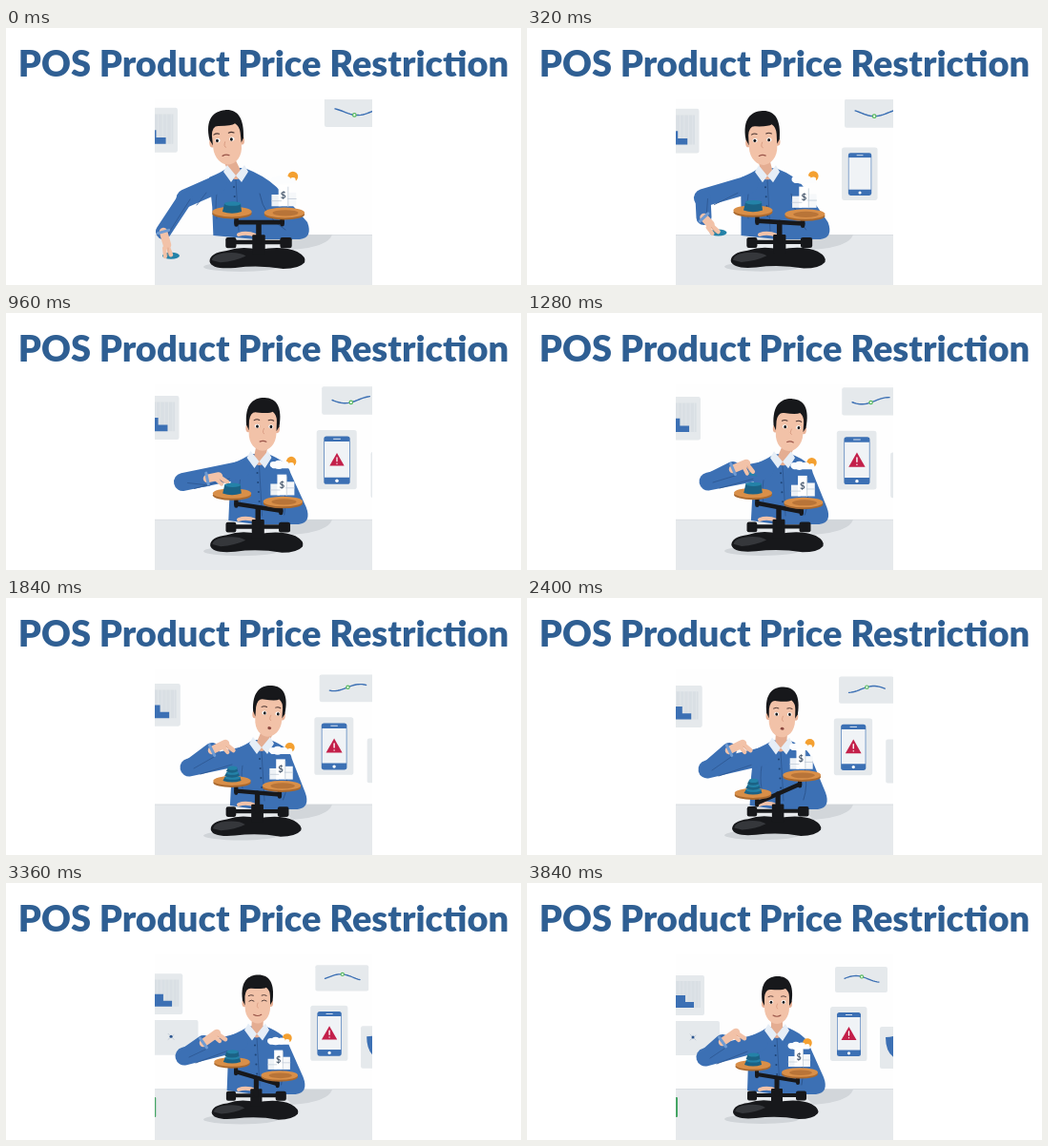
These frames come from a looping animation (540 by 270 pixels, 3.92 s). An HTML page with a canvas:

```html
<!DOCTYPE html>
<html lang="en">
<head>
<meta charset="utf-8">
<title>POS Product Price Restriction</title>
<style>
html, body { margin: 0; width: 100%; height: 100%; overflow: hidden; background: #fff; }
canvas, svg { position: absolute; left: 0; top: 0; width: 540px; height: 270px; }
text { font: 900 38px Lato, sans-serif; fill: #2f5f93; text-anchor: middle; }
</style>
</head>
<body>
<canvas id="scene" width="540" height="270"></canvas>
<svg viewBox="0 0 540 270"><text x="270" y="51">POS Product Price Restriction</text></svg>
<script>
const LOOP = 3920, STEP = 80;
const c = document.getElementById('scene').getContext('2d');
const BLUE = '#3c70b4', DARK = '#2c5690', SKIN = '#f2c2a8', INK = '#17181b';
const PANEL = '#e5e9ec', TAN = '#d98f48', TEAL = '#2482a8';

// Poses: one row per time, eased in between
const TIMES = [0, 640, 1280, 1840, 2400, 3360, 3840];
const BODY = [ // chin x, head tilt, collar x
  [234, -.1, 241], [263, 0, 263], [274, .06, 268], [274, .07, 268],
  [267, .02, 266], [264, -.01, 263], [262, 0, 262]];
const ARM = [ // elbow, wrist, hand, finger angle
  [188, 179, 165, 214, 169, 228, 1.2], [181, 178, 206, 184, 216, 185, .3],
  [190, 177, 216, 164, 230, 158, .9], [192, 178, 216, 160, 230, 153, .7],
  [189, 180, 212, 160, 226, 153, .7], [187, 182, 207, 168, 221, 158, .6],
  [187, 183, 205, 167, 219, 157, .6]];
const SCALE = [ // left pan y, right pan y, load height, sun above pan
  [193, 194, 9, 39], [190, 197, 9, 43], [189, 199, 10, 43], [192, 197, 14, 41],
  [205, 186, 14, 34], [188, 202, 12, 40], [191, 199, 12, 32]];

function pose(rows, t) {
  let i = 0;
  while (i < TIMES.length - 2 && t >= TIMES[i + 1]) i++;
  const p = Math.min(1, (t - TIMES[i]) / (TIMES[i + 1] - TIMES[i]));
  const e = p * p * (3 - 2 * p);
  return rows[i].map((v, k) => v + (rows[i + 1][k] - v) * e);
}

const fill = (d, color) => { c.fillStyle = color; c.fill(new Path2D(d)); };
const line = (d, color, w) => {
  c.strokeStyle = color; c.lineWidth = w; c.lineCap = c.lineJoin = 'round';
  c.stroke(new Path2D(d));
};
const rect = (x, y, w, h, color, r = 0) => {
  c.fillStyle = color; c.beginPath(); c.roundRect(x, y, w, h, r); c.fill();
};
const oval = (x, y, rx, ry, color, a = 0) => {
  c.fillStyle = color; c.beginPath(); c.ellipse(x, y, rx, ry, a, 0, 7); c.fill();
};
function zoom(x, y, k, draw) {
  c.save(); c.translate(x, y); c.scale(k, k); c.translate(-x, -y); draw(); c.restore();
}
const pop = (t, start, len = 320) => {
  const p = Math.max(0, Math.min(1, (t - start) / len));
  return 1 - (1 - p) ** 3;
};

function wall(t) {
  // Step chart
  rect(130, 97, 56, 42, PANEL, 2);
  rect(150, 103, 32, 28, '#d9dfe4');
  for (let x = 156; x < 182; x += 4) line(`M${x} 103V131`, '#e5e9ec', .6);
  fill('M150 118H166V125H175V131H150Z', BLUE);

  // Travelling wave with a fixed node
  rect(323, 88, 55, 27, PANEL, 2);
  const crest = 380 - t * .0092;
  const wave = x => 100.8 - 3.3 * Math.cos((x - crest) * 2 * Math.PI / 52);
  let d = '';
  for (let x = 333; x <= 369; x += 2) d += (d ? 'L' : 'M') + x + ' ' + wave(x);
  line(d, BLUE, 1.3);
  oval(351, wave(351), 2.1, 2.1, '#55b95c');
  oval(351, wave(351), 1, 1, '#fff');

  // Phone
  const phone = pop(t, 160);
  if (phone) zoom(337, 158, phone, () => {
    rect(318, 130, 38.5, 57, PANEL, 2.5);
    rect(325, 136, 25, 46, BLUE, 2.5);
    rect(325.6, 141, 23.8, 34.5, '#f0f3f6');
    rect(334, 138, 7, 1, '#cfdced');
    oval(337.5, 178.8, 1.6, 1.6, '#fff');
    const alert = pop(t, 800);
    if (alert) zoom(337.5, 159, alert, () => {
      fill('M337.5 151L345.5 165H329.5Z', '#c3204a');
      line('M337.5 156V160M337.5 162.6V162.7', '#fff', 1.3);
    });
  });

  // Shield
  rect(370, 151, 40, 44, PANEL, 2);
  const shield = pop(t, 2300, 900);
  if (shield) zoom(388, 171, shield, () => fill('M376 162Q384 162 388 159V185Q376 180 376 162Z', BLUE));

  // Target board
  const board = pop(t, 2560, 480);
  if (board) zoom(172, 163, board, () => {
    rect(142, 145, 60, 36, PANEL, 2);
    line('M171 159L177 165M177 160L171 165', '#b4c0ce', .7);
    oval(174, 162, 1.5, 1.5, DARK);
  });
}

function table(t, u) {
  rect(156, 217.5 - u, 228, 60, '#e6e9ec');
  rect(156, 217 - u, 228, 1, '#dadee2');
  if (t > 3000) rect(150, 225, 4 + 4 * pop(t, 3000, 840), 21, '#45a564', 1);
  fill('M285 217H342Q338 230 300 233Z', '#d2d6da');
  oval(246, 248 + 3 * (1 - u), 39, 5, '#d0d4d8');
}

function torso(x, y, u) {
  const m = x - 262, e = 5 * (1 - u);
  fill(`M${x - 28} ${y + 5}Q${x - 14} ${y - 1} ${x - 9} ${y - 5}H${x + 9}
    Q${x + 30} ${y + 3} ${x * .6 + 139} ${y + 15}L${311 + e} 204Q${317 + e} 220 ${303 + e} 222
    H262L${231 + m * .65} 218L${232 + m * .75} 188Z`, BLUE);
  line(`M${x + 25} ${y + 22}Q${x + 29} 198 ${288 + e} 212`, DARK, 1);
  line(`M${x} ${y + 7}L${x + 3} 213`, DARK, .8);
  for (let i = 0; i < 4; i++) oval(x - 2 + i * .7, y + 15 + i * 10, 1, 1, '#1f4577');
  line(`M${x - 20} ${y + 22}Q${x - 22} 190 ${x - 20} 200`, DARK, .8);
  line('M244 217Q252 214 262 218', SKIN, 4);
}

function collar(x, y, chin, chinY) {
  line(`M${chin} ${chinY - 5}L${x} ${y + 1}`, '#e4ad92', 12);
  fill(`M${x - 9} ${y - 8}L${x} ${y + 3}L${x - 5} ${y + 10}L${x - 13} ${y - 1}Z
    M${x + 9} ${y - 8}L${x} ${y + 3}L${x + 6} ${y + 10}L${x + 13} ${y - 1}Z`, '#e6eef7');
}

function head(t, x, y, tilt, u) {
  c.save();
  c.translate(x, y); c.rotate(tilt); c.scale(1.15 - .15 * u, 1.15 - .15 * u);
  oval(-13.6, -21, 2.4, 4, '#e9b297');
  oval(13.6, -21, 2.4, 4, '#e9b297');
  fill('M-15.5 -24C-18 -44 -9 -50 1 -50C12 -50 18 -42 15.5 -23L13 -19H-13Z', INK);
  fill('M-13 -28Q-12 -37 -6 -36Q6 -35 9 -37Q13 -34 13 -28V-17C13 -6 6 0 0 0S-13 -6 -13 -17Z', SKIN);
  const look = tilt * 22;
  c.translate(look, 0);
  line('M-9 -28.5Q-6.5 -30 -4 -28.8M4.5 -28.8Q7 -30 9.5 -28.5', '#4a3430', .9);
  if (t >= 3280 && t < 3440) {
    line('M-8.5 -23Q-6 -25 -3.5 -23M4.5 -23Q7 -25 9.5 -23', '#4a3430', .9);
  } else {
    for (const ex of [-6, 7]) {
      oval(ex, -23, 2.3, 1.9, '#fff');
      oval(ex + look * .2, -22.8, 1.3, 1.5, INK);
    }
  }
  line('M.5 -21Q-1.5 -16.5 .8 -16', '#d99c82', .8);
  if (t > 1600 && t < 2700) oval(0, -8.5, 1.8, 1.4, '#8c4840');
  else line(t < 1600 ? 'M-3 -8.5Q0 -10 3 -8.5' : 'M-4 -9Q0 -6.5 4 -9', '#9a5549', 1.1);
  c.restore();
}

function arm(t, sx, sy, [ex, ey, wx, wy, hx, hy, a]) {
  line(`M${sx} ${sy}L${ex} ${ey}`, BLUE, 19);
  line(`M${ex} ${ey}L${wx} ${wy}`, BLUE, 16);
  line(`M${ex + 12} ${ey + 7}L${sx - 12} ${sy + 9}`, DARK, .8);
  line(`M${ex + 5} ${ey + 1}L${wx + 2} ${wy + 7}`, DARK, .8);
  const tx = hx + 11 * Math.cos(a), ty = hy + 11 * Math.sin(a);
  if (t < 560) oval(tx, ty + 1, 9, 3.5, TEAL);
  else if (t > 960 && t < 1440) fill(`M${tx - 4} ${ty - 1}L${tx + 5} ${ty + 5}L${tx - 4} ${ty + 4}Z`, TEAL);
  line(`M${wx} ${wy}L${hx} ${hy}`, SKIN, 8.5);
  line(`M${hx} ${hy}L${tx} ${ty}`, SKIN, 4.5);
  line(`M${hx - 3} ${hy + 3}L${tx - 6} ${ty + 2}`, SKIN, 4);
  line(`M${hx + 1} ${hy + 3}L${tx - 3} ${ty + 1}`, '#d99c82', .7);
  const b = Math.atan2(hy - wy, hx - wx), nx = -Math.sin(b) * 6, ny = Math.cos(b) * 6;
  line(`M${wx - nx} ${wy - ny}L${wx + nx} ${wy + ny}`, '#6f9bd2', 3);
}

function pan(x, y, r) {
  oval(x, y + 1.8, r, 4.8, '#a9692f');
  oval(x, y, r, 4.8, TAN);
}

function balance(left, right, load, sun) {
  fill(`M216 241Q216 233 232 231Q246 226 262 230Q285 226 298 232Q307 237 305 242
    Q300 248 285 248Q262 244 240 247Q218 249 216 241Z`, INK);
  fill('M218 240Q219 234 232 233Q244 232 250 236Q240 241 226 242Z', '#35373b');
  rect(256, 216, 12, 18, INK, 1);
  line('M236 223H290', INK, 4);
  rect(231, 218.5, 10, 10, INK, 2);
  rect(282, 218.5, 11, 10, INK, 2);
  line(`M262 ${(left + right) / 2 + 10}V222`, INK, 5);
  line(`M241 ${left + 10}L284 ${right + 9}`, INK, 4.2);
  line(`M241 ${left + 4}V${left + 12}M284 ${right + 4}V${right + 11}`, INK, 4);

  // Goods
  pan(237, left, 18.5);
  const tiers = load < 11 ? 1 : load < 13 ? 2 : 3, h = load / tiers;
  for (let i = 0; i < tiers; i++) {
    const w = 9 - i * 1.6, y = left + 1 - i * h;
    fill(`M${237 - w} ${y - 1}L${239 - w} ${y - h}H${236 + w}L${237 + w} ${y - 1}Q237 ${y + 2} ${237 - w} ${y - 1}Z`, '#1b6285');
    oval(237.5, y - h + .5, w - 1.2, 2, TEAL);
  }

  // Money, cloud and sun
  pan(286, right, 19);
  oval(287, right + .3, 12, 2.8, '#b87438');
  const y = right - 6;
  oval(294, right - sun + 1, 4.8, 4.8, '#f4a030');
  for (const [dx, r] of [[-9, 3.5], [-4, 5], [2, 4], [8, 2.5]]) oval(286 + dx, right - sun + 4, r, r * .85, '#fcfdfe');
  rect(275, right - sun + 4, 22, 3.6, '#fcfdfe', 2);
  rect(274, y - 11, 9, 11, '#eef2f6');
  rect(289, y - 13, 8, 13, '#f6f8fa');
  rect(280.5, y - 20, 9, 20, '#fff');
  line(`M274 ${y - 5}H283M289 ${y - 7}H297M289.5 ${y - 18}V${y}`, '#bfcad6', .7);
  c.font = 'bold 9px Lato, sans-serif';
  c.textAlign = 'center';
  c.fillStyle = '#47586d';
  c.fillText('$', 285, y - 7);
}

function draw(t) {
  const u = t / 3840, k = 1.12 - .12 * u;
  const [chin, tilt, cx] = pose(BODY, t);
  const [left, right, load, sun] = pose(SCALE, t);
  const chinY = 143.5 + 4.5 * u, cy = 152 + 4 * u;
  const local = y => 206 + (y - 206) / k;
  c.clearRect(0, 0, 540, 270);
  c.save();
  c.beginPath(); c.rect(156, 75, 228, 195); c.clip();
  rect(156, 75, 228, 195, '#fefefe');
  zoom(235, 205, (1 - .11 * u) / .89, () => wall(t));
  table(t, u);
  torso(cx, cy, u);
  collar(cx, cy, chin, chinY);
  head(t, chin, chinY, tilt, u);
  arm(t, cx - 19, cy + 12, pose(ARM, t));
  zoom(237, 206, k, () => balance(local(left), local(right), load, sun / k));
  c.restore();
}

const start = performance.now();
function tick() {
  const t = (performance.now() - start) % LOOP;
  draw(Math.floor(t / STEP) * STEP);
  requestAnimationFrame(tick);
}
tick();
</script>
</body>
</html>
```
